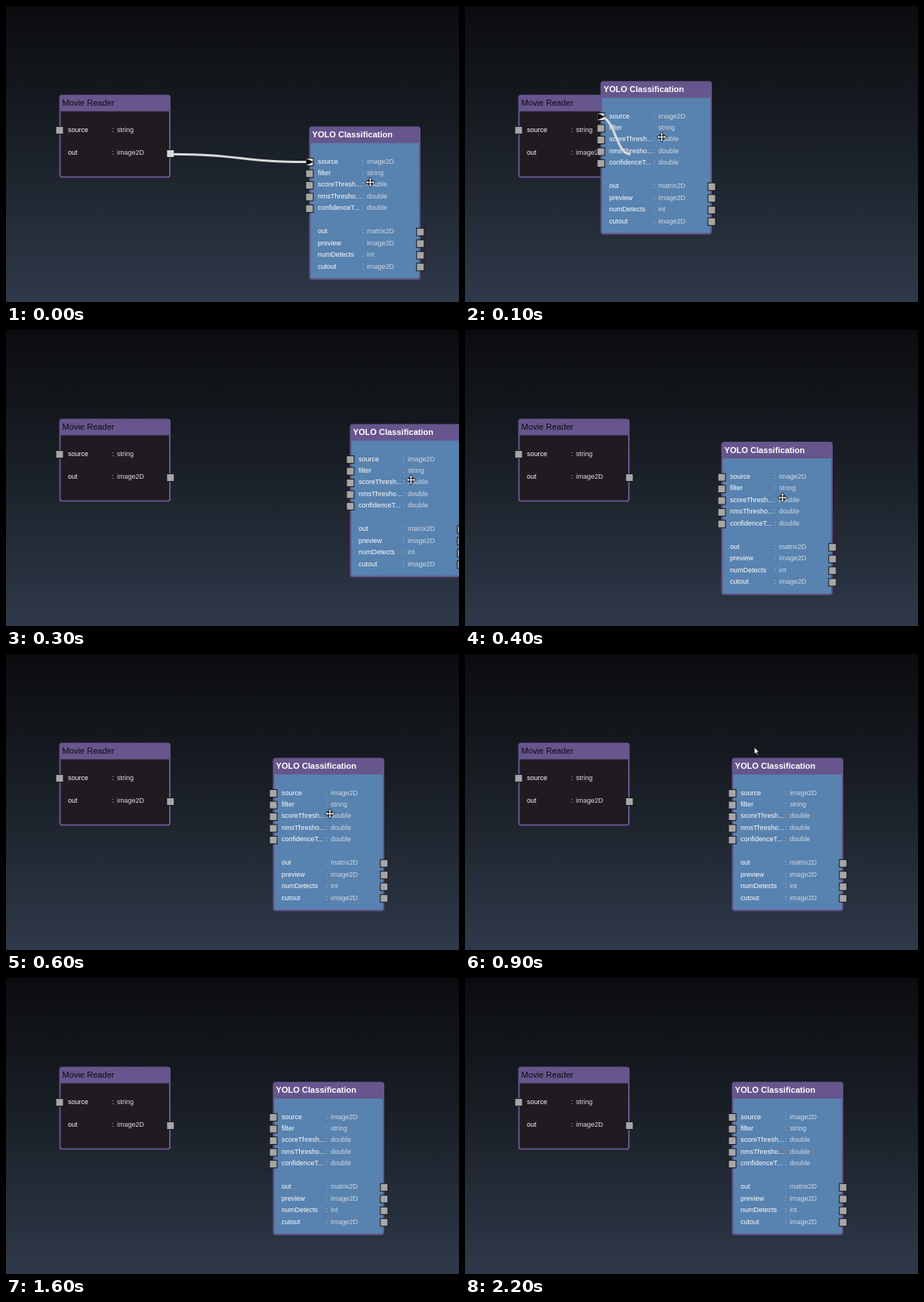
An HTML page with a canvas that plays this animation: 600 px wide and 392 px high, repeating every 2.3 s.

```html
<!DOCTYPE html>
<html lang="en">
<head>
<meta charset="utf-8">
<title>Node editor</title>
<style>
html, body { margin: 0; height: 100%; overflow: hidden; background: #0b0c0f; }
canvas { display: block; }
</style>
</head>
<body>
<canvas id="stage" width="600" height="392"></canvas>
<script>
const ctx = document.getElementById('stage').getContext('2d');
const FONT = '"Liberation Sans", Arial, sans-serif';
const PURPLE = '#67558d', SOCKET = '#a6a6a6', LIT = '#d9dadb';
const STEP = 100, STEPS = 23;
const ROW = 15.45;

const reader = {
  title: 'Movie Reader', titleColor: '#0c0a10', weight: '', body: '#1f1b20', typeColor: '#dededf', height: 109,
  rows: [[0, 'source', 'string', 'in'], [2, 'out', 'image2D', 'out']]
};
const yolo = {
  title: 'YOLO Classification', titleColor: '#fff', weight: 'bold ', body: '#5882af', typeColor: '#d0d9e2', height: 202,
  rows: [
    [0, 'source', 'image2D', 'in'], [1, 'filter', 'string', 'in'],
    [2, 'scoreThresh...', 'double', 'in'], [3, 'nmsThresho...', 'double', 'in'],
    [4, 'confidenceT...', 'double', 'in'],
    [6, 'out', 'matrix2D', 'out'], [7, 'preview', 'image2D', 'out'],
    [8, 'numDetects', 'int', 'out'], [9, 'cutout', 'image2D', 'out']
  ]
};

// Node positions while it is shaken loose, one per step; it rests at the last.
const shake = [[402, 160], [180, 100], [-42, 45], [456, 125], [340, 148.5], [349, 142], [354, 138]];

function text(str, x, y, color, font) {
  ctx.font = font + ' ' + FONT;
  ctx.fillStyle = color;
  ctx.fillText(str, x, y);
}

function box(x, y, w, h, color, radius) {
  ctx.beginPath();
  ctx.roundRect(x, y, w, h, radius);
  ctx.fillStyle = color;
  ctx.fill();
}

function socket(x, y, color) {
  box(x - 5.5, y - 5.5, 11, 11, '#15161a', 0);
  box(x - 4.5, y - 4.5, 9, 9, color, 0);
}

function polygon(points, fill, stroke) {
  ctx.beginPath();
  points.forEach(p => ctx.lineTo(...p));
  ctx.closePath();
  ctx.fillStyle = fill;
  ctx.fill();
  if (stroke) {
    ctx.strokeStyle = stroke;
    ctx.lineWidth = 1;
    ctx.stroke();
  }
}

function drawNode(node, x, y, litRow) {
  box(x - 0.5, y - 0.5, 147.5, node.height + 1, PURPLE, 4);
  box(x + 1.5, y + 21.5, 143.5, node.height - 23, node.body, [0, 0, 2, 2]);
  text(node.title, x + 3.5, y + 14.3, node.titleColor, node.weight + '11.1px');
  for (const [k, label, type, side] of node.rows) {
    const base = y + 48.5 + k * ROW;
    text(label, x + 11, base, '#fff', '9px');
    text(':', x + 69.5, base, node.typeColor, '9px');
    text(type, x + 76, base, node.typeColor, '9px');
    socket(side === 'in' ? x : x + 146.8, y + 46.6 + k * ROW, k === litRow ? LIT : SOCKET);
  }
}

function drawLink(x, y) {
  const x0 = 219, y0 = 196.3, mid = (x0 + x) / 2;
  ctx.beginPath();
  ctx.moveTo(x0, y0);
  ctx.bezierCurveTo(mid, y0, mid, y, x - 2, y);
  ctx.strokeStyle = LIT;
  ctx.lineWidth = 3;
  ctx.stroke();
  polygon([[x - 4.5, y - 4.5], [x + 5, y], [x - 4.5, y + 4.5]], '#08080a');
}

function drawMoveCursor(x, y) {
  const quarter = [[1, -1], [1, -3], [2.5, -3], [0, -6.5], [-2.5, -3], [-1, -3]];
  const points = [];
  for (let i = 0; i < 4; i++) {
    const a = -i * Math.PI / 2, c = Math.cos(a), s = Math.sin(a);
    quarter.forEach(([u, v]) => points.push([x + u * c - v * s, y + u * s + v * c]));
  }
  polygon(points, '#fff', '#14161a');
}

function drawArrowCursor(x, y) {
  const shape = [[0, 0], [0, 9.5], [2.2, 7.5], [3.9, 11], [5.5, 10.2], [3.9, 6.8], [6.6, 6.6]];
  polygon(shape.map(([u, v]) => [x + u, y + v]), '#fff', '#08080a');
}

function drawCursor(step, x, y) {
  if (step === 2 || step > 12) return;
  if (step < 6) return drawMoveCursor(x + 80.5, y + 73.5);
  const p = (step - 6) / 6;
  const cx = 429 - 92 * p, cy = 211.5 - 176.5 * p;
  (cy > 138 ? drawMoveCursor : drawArrowCursor)(cx, cy);
}

const sky = ctx.createLinearGradient(0, 0, 0, 392);
sky.addColorStop(0, '#0b0c0f');
sky.addColorStop(0.5, '#1b2129');
sky.addColorStop(1, '#2f394a');

function draw(now) {
  const step = Math.floor(now / STEP) % STEPS;
  const [x, y] = shake[Math.min(step, shake.length - 1)];
  const linked = step < 2;
  ctx.fillStyle = sky;
  ctx.fillRect(0, 0, 600, 392);
  drawNode(reader, 71, 118, linked ? 2 : -1);
  drawNode(yolo, x, y, linked ? 0 : -1);
  if (linked) drawLink(x, y + 46.6);
  drawCursor(step, x, y);
}

const start = performance.now();
function loop() {
  draw(performance.now() - start);
  requestAnimationFrame(loop);
}
loop();
</script>
</body>
</html>
```
